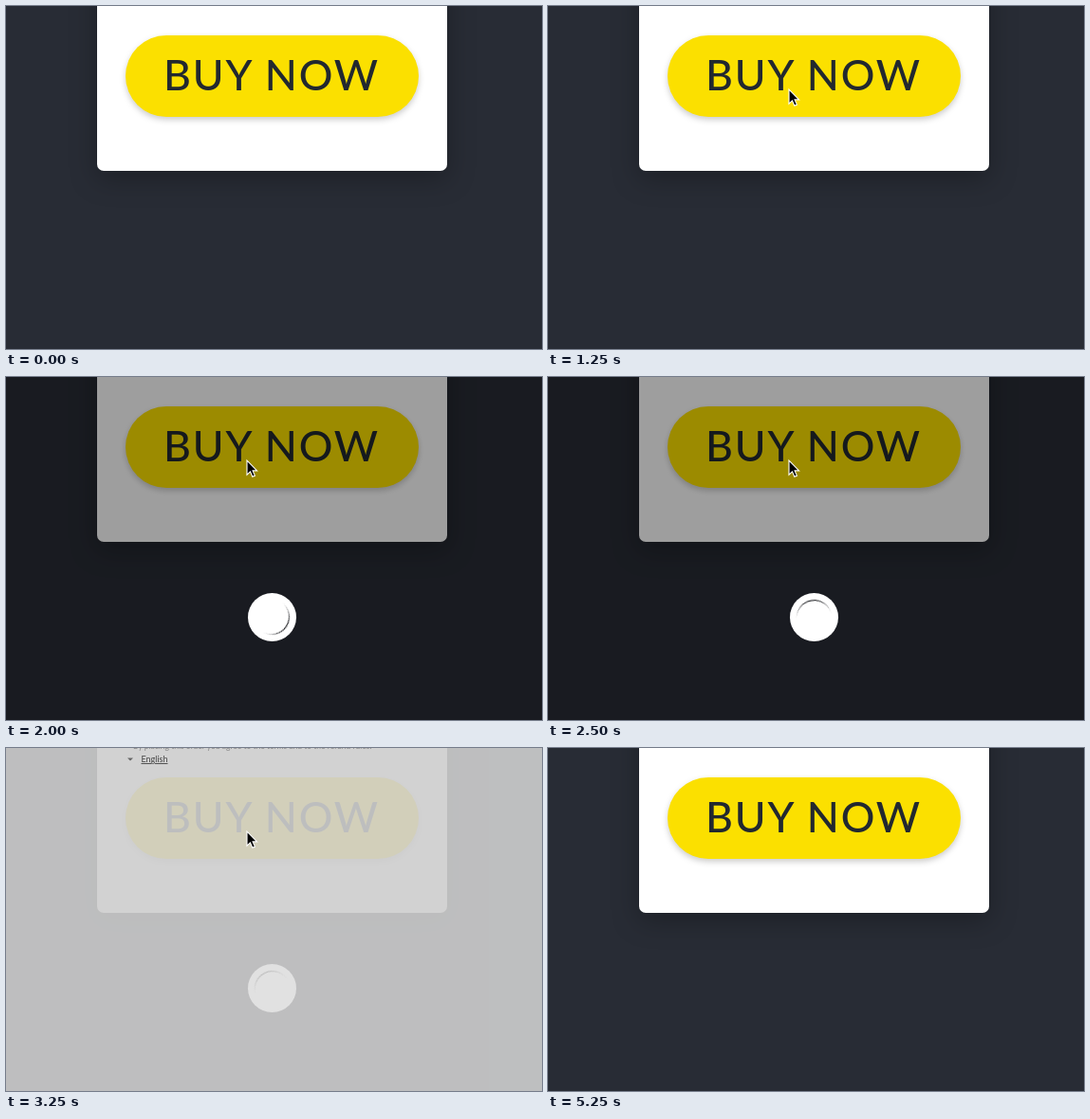
These frames come from a looping animation (565 px wide and 362 px high, 5750 ms). An HTML page:

```html
<!DOCTYPE html>
<html lang="en">
<head>
<meta charset="utf-8">
<title>Buy now</title>
<style>
  html, body { margin: 0; height: 100%; overflow: hidden; background: #282c35; }
  svg { display: block; width: 100vw; height: 100vh; }
  text { font-family: Lato, sans-serif; }

  .card { fill: #fff; filter: drop-shadow(0 8px 14px rgba(0, 0, 0, .28)); }
  .button { fill: #fbe000; filter: drop-shadow(0 3px 3px rgba(0, 0, 0, .2)); }
  .label { fill: #22282f; font-size: 44.5px; font-weight: 500; letter-spacing: 1.9px; text-anchor: middle; }
  .small { fill: #444; font-size: 9px; }
  .note { fill: #888; font-size: 8.5px; }

  .veil, .panel, .footer, .loader, .disc, .arc, .spin, .cursor {
    animation: 5750ms step-end infinite;
  }
  .veil { animation-name: veil; }
  .panel { animation-name: panel; }
  .footer { animation-name: footer; }
  .loader { animation-name: loader; }
  .disc { animation-name: disc; }
  .arc { animation-name: arc; }
  .spin { animation-name: spin; animation-timing-function: steps(23); }
  .cursor { animation-name: cursor; }

  @keyframes veil {
    0%, 91.304% { fill: rgba(0, 0, 0, 0); }
    26.086% { fill: rgba(0, 0, 0, .38); }
    47.826% { fill: rgba(206, 206, 206, .907); }
    60.869% { fill: rgba(220, 220, 220, .847); }
    100% { fill: rgba(0, 0, 0, 0); }
  }
  @keyframes panel {
    0%, 52.173%, 100% { visibility: hidden; }
    47.826% { visibility: visible; }
  }
  @keyframes footer {
    0%, 91.304%, 100% { visibility: hidden; }
    52.173% { visibility: visible; }
  }
  @keyframes loader {
    0%, 60.869%, 100% { visibility: hidden; }
    26.086% { visibility: visible; }
  }
  @keyframes disc {
    0%, 100% { fill: #fff; }
    47.826% { fill: #e1e1e1; }
  }
  @keyframes arc {
    0%, 100% { fill: #1b1c20; }
    47.826% { fill: #bcbcbc; }
  }
  @keyframes spin {
    from { transform: rotate(-519deg); }
    to { transform: rotate(2103deg); }
  }
  @keyframes cursor {
    0%, 60.869%, 100% { visibility: hidden; transform: translate(279px, 89px); }
    4.347% { visibility: visible; transform: translate(279px, 89px); }
    8.695% { visibility: visible; transform: translate(273px, 92px); }
    13.043% { visibility: visible; transform: translate(269px, 85px); }
    17.391% { visibility: visible; transform: translate(251px, 82px); }
    21.739% { visibility: visible; transform: translate(253px, 87px); }
  }
</style>
</head>
<body>
<svg viewBox="0 0 565 362">
  <rect width="565" height="362" fill="#282c35"/>
  <rect class="card" x="96" y="-40" width="369" height="214" rx="7"/>
  <rect class="button" x="126" y="31" width="309" height="86" rx="43"/>
  <text class="label" x="280" y="89">BUY NOW</text>

  <rect class="veil" width="565" height="362"/>
  <rect class="panel" x="128" y="-10" width="305" height="67" fill="#fff" fill-opacity=".26"/>

  <g class="footer">
    <text class="note" x="134" y="0.8">By placing this order you agree to the terms and to the refund rules.</text>
    <path d="M128 10.5h6l-3 3z" fill="#666"/>
    <text class="small" x="142.5" y="15" text-decoration="underline">English</text>
  </g>

  <g class="loader" transform="translate(280.5 253.5)">
    <circle class="disc" r="25.5"/>
    <g class="spin">
      <path class="arc" d="M0-18.4A18.4 18.4 0 0 1 0 18.4A17.3 18.4 0 0 0 0-18.4"/>
    </g>
  </g>

  <g class="cursor">
    <path d="M1 1V16.2L4.5 12.9L6.8 18.2L9.4 17.1L7.1 11.9H11.6Z" fill="#000" stroke="#fff" stroke-width="1.1"/>
  </g>
</svg>
</body>
</html>
```
